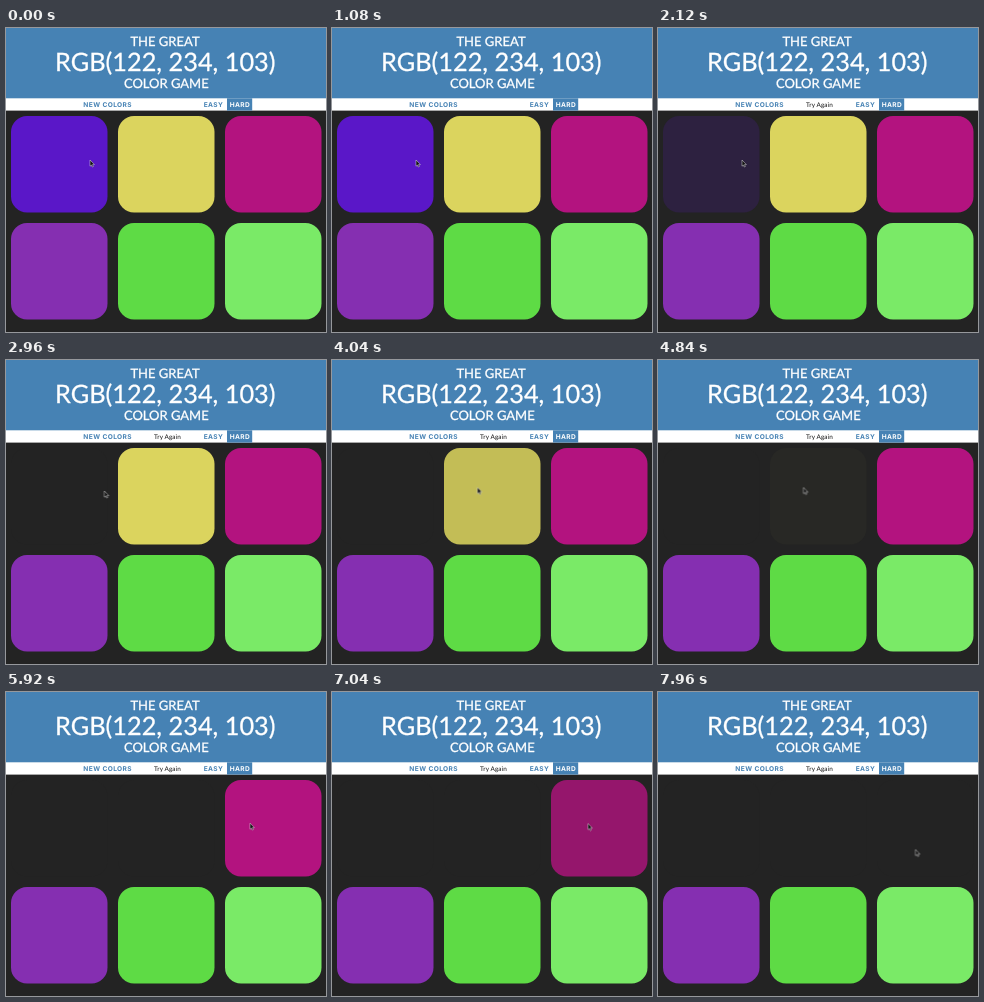
An HTML page that plays this animation: 320x304 px, repeating every 8000 ms.

```html
<!DOCTYPE html>
<html lang="en">
<head>
<meta charset="utf-8">
<title>Color Game</title>
<style>
  :root { --page: #232323; --blue: #4682b4; --loop: 8s; }
  html, body { margin: 0; width: 100%; height: 100%; overflow: hidden; background: var(--page); }
  svg { display: block; width: 100%; height: 100%; }

  text { text-anchor: middle; text-rendering: geometricPrecision; font-family: Lato, Avenir, sans-serif; }
  .title { fill: #fff; stroke: #fff; stroke-width: .3px; font-size: 13px; }
  .goal { font-size: 25.3px; }
  .button { fill: var(--blue); font: 700 6.6px Inter, sans-serif; letter-spacing: .4px; }
  .active { fill: #fff; }
  .message { fill: #111; font-size: 6.4px; letter-spacing: .1px; animation: show var(--loop) step-end infinite; }

  .tile { width: 96.5px; height: 96.5px; rx: 16px; }
  .first { animation: fade-first var(--loop) infinite; }
  .second { animation: fade-second var(--loop) infinite; }
  .third { animation: fade-third var(--loop) infinite; }
  .cursor { animation: move var(--loop) ease-in-out infinite; }

  @keyframes show {
    0% { opacity: 0; }
    18.7%, 100% { opacity: 1; }
  }
  @keyframes fade-first {
    0%, 18.7% { fill: #5a17c8; animation-timing-function: ease; }
    33.7%, 100% { fill: #232323; }
  }
  @keyframes fade-second {
    0%, 48.7% { fill: #dbd45e; animation-timing-function: ease; }
    63.7%, 100% { fill: #232323; }
  }
  @keyframes fade-third {
    0%, 85.7% { fill: #b3137f; animation-timing-function: ease; }
    100% { fill: #232323; }
  }
  @keyframes move {
    0%, 34% { transform: translate(84px, 132px); }
    43%, 64% { transform: translate(145.5px, 127.5px); }
    77%, 91% { transform: translate(256px, 131.5px); }
    98%, 100% { transform: translate(257.5px, 157.5px); }
  }
</style>
</head>
<body>
<svg viewBox="0 0 320 304" preserveAspectRatio="none">
  <rect width="320" height="304" fill="#232323"/>
  <rect width="320" height="71" fill="#4682b4"/>
  <rect y="70.3" width="320" height="12.3" fill="#fff"/>

  <text class="title" x="159" y="18">THE GREAT</text>
  <text class="title goal" x="159.3" y="43">RGB(122, 234, 103)</text>
  <text class="title" x="160.3" y="60">COLOR GAME</text>

  <text class="button" x="101.7" y="79">NEW COLORS</text>
  <text class="message" x="161.5" y="79">Try Again</text>
  <text class="button" x="207.5" y="79">EASY</text>
  <rect x="221" y="70.3" width="25.2" height="12.3" fill="#4682b4"/>
  <text class="button active" x="234" y="79">HARD</text>

  <rect class="tile first" x="5" y="88"/>
  <rect class="tile second" x="112" y="88"/>
  <rect class="tile third" x="219" y="88"/>
  <rect class="tile" x="5" y="195" fill="#852fb1"/>
  <rect class="tile" x="112" y="195" fill="#5edb45"/>
  <rect class="tile" x="219" y="195" fill="#7aea67"/>

  <path class="cursor" d="M0 0V6.2L1.4 5L2.3 7L3.3 6.6L2.5 4.6H4.4Z"
        fill="#111" stroke="#ddd" stroke-width=".5" stroke-linejoin="round"/>
</svg>
</body>
</html>
```
